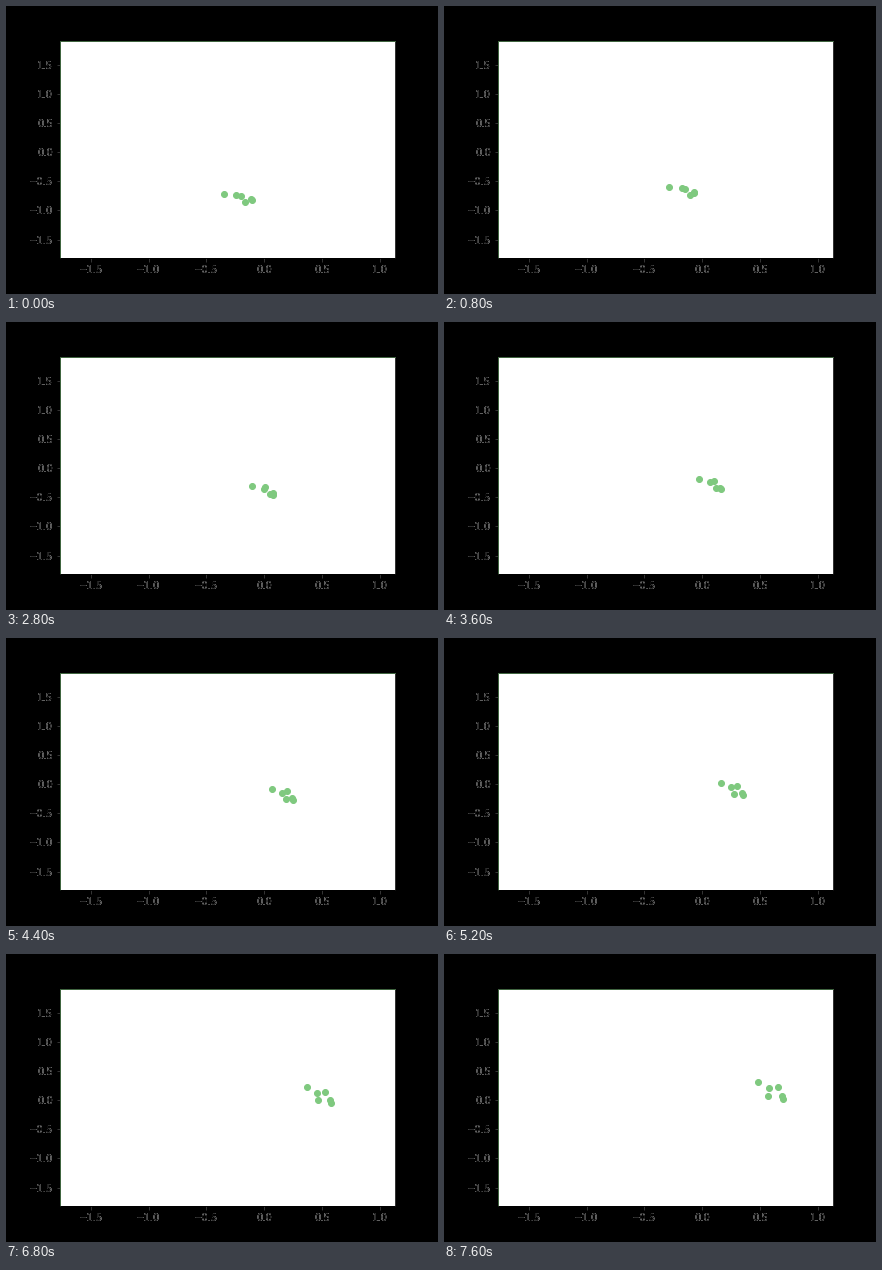
A matplotlib script that plays this animation: 432 px wide and 288 px high, repeating every 8000 ms.

```python
import numpy as np
import matplotlib.pyplot as plt
from matplotlib.animation import FuncAnimation

WIDTH, HEIGHT, DPI = 432, 288, 72
FRAMES, INTERVAL = 20, 400
GREEN, EDGE_GREEN, GREY = "#7fc97f", "#406540", "#404040"

# Axes box and data scale, in stage pixels measured from the top left
LEFT, RIGHT, TOP, BOTTOM = 54, 388.8, 34.56, 252
ZERO_X, ZERO_Y = 258.3, 146.2
UNIT_X, UNIT_Y = 115.8, 58.2
BOX = [LEFT / WIDTH, 1 - BOTTOM / HEIGHT,
       (RIGHT - LEFT) / WIDTH, (BOTTOM - TOP) / HEIGHT]

# Each dot glides along a parabola through its start, middle and end
KEY_STEPS = [0, 9, 19]
DOT_KEYS = np.array([
    [(218.4, 187.8), (255.3, 157.1), (313.9, 128.1)],
    [(230.2, 189.0), (269.7, 159.0), (333.6, 133.3)],
    [(235.5, 190.5), (266.5, 160.5), (325.2, 134.1)],
    [(238.8, 195.9), (276.5, 167.5), (339.5, 144.7)],
    [(244.5, 193.0), (276.2, 165.7), (338.2, 142.0)],
    [(245.7, 193.8), (272.0, 166.4), (324.0, 142.1)],
])
CURVES = np.polyfit(KEY_STEPS, DOT_KEYS.transpose(1, 0, 2).reshape(3, -1), 2)


def to_data(x, y):
    return (x - ZERO_X) / UNIT_X, (ZERO_Y - y) / UNIT_Y


def add_axes(name):
    axes = fig.add_axes(BOX, label=name)
    (x_min, y_min), (x_max, y_max) = to_data(LEFT, BOTTOM), to_data(RIGHT, TOP)
    axes.set(xticks=np.arange(-1.5, 1.1, 0.5), yticks=np.arange(-1.5, 1.6, 0.5),
             xlim=(x_min, x_max), ylim=(y_min, y_max))
    return axes


def add_labels(name, color):
    labels = add_axes(name)
    labels.patch.set_visible(False)
    labels.spines[:].set_visible(False)
    labels.tick_params(color="none", labelcolor=color)


plt.rcParams.update({"font.family": "DejaVu Sans", "font.size": 10})
fig = plt.figure(figsize=(WIDTH / DPI, HEIGHT / DPI), dpi=DPI, facecolor="black")

ax = add_axes("plot")
ax.tick_params(color=GREY, labelcolor="none")
ax.spines[["left", "top"]].set(color=EDGE_GREEN, linewidth=1)
ax.spines["right"].set(color="#333333", linewidth=1)

# Black text over white leaves only a thin pale fringe
for number, color in enumerate(("white", "white", "black")):
    add_labels(f"labels {number}", color)

dots = ax.scatter(np.zeros(6), np.zeros(6), s=36, color=GREEN, linewidths=1, zorder=3)


def update(step):
    x, y = np.polyval(CURVES, step).reshape(-1, 2).T
    dots.set_offsets(np.column_stack(to_data(x, y)))
    return dots,


anim = FuncAnimation(fig, update, frames=FRAMES, interval=INTERVAL,
                     repeat=True, repeat_delay=0)
plt.show()
```
